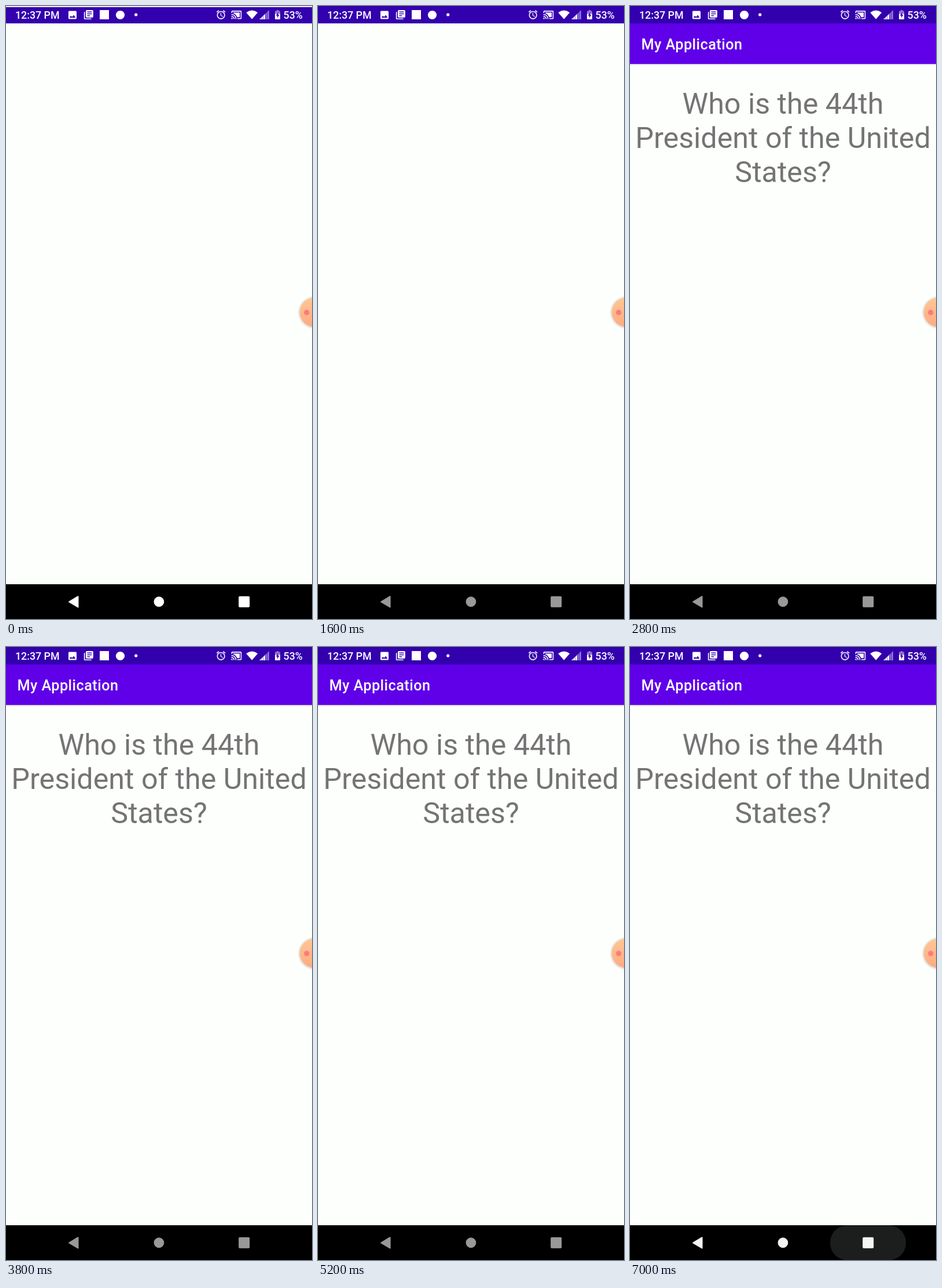
An HTML page for the animation above (7.1 s loop, 529x1058 px).

```html
<!DOCTYPE html>
<html lang="en">
<head>
<meta charset="utf-8">
<title>Quiz app launch</title>
<style>
  html, body { margin: 0; width: 100%; height: 100%; overflow: hidden; background: #fdfffc; }
  svg { display: block; width: 100vw; height: 100vh; }
  text { font-family: Roboto, "Noto Sans", sans-serif; }
  .status { font-size: 17.8px; font-weight: 500; }
  .title { font-size: 25.2px; font-weight: 500; letter-spacing: .5px; }
  .question { font-size: 50.25px; fill: #747474; text-anchor: middle; }
</style>
</head>
<body>
<svg viewBox="0 0 529 1058" xmlns="http://www.w3.org/2000/svg">
  <defs>
    <linearGradient id="peach" x1="0" y1="0" x2="0" y2="1">
      <stop offset="0" stop-color="#ffc795"/>
      <stop offset="1" stop-color="#ffaa80"/>
    </linearGradient>
    <radialGradient id="halo">
      <stop offset=".86" stop-color="#b9a898" stop-opacity=".45"/>
      <stop offset="1" stop-color="#b9a898" stop-opacity="0"/>
    </radialGradient>
    <linearGradient id="shade" x1="0" y1="0" x2="0" y2="1">
      <stop offset="0" stop-color="#6040a0" stop-opacity=".25"/>
      <stop offset="1" stop-color="#6040a0" stop-opacity="0"/>
    </linearGradient>
  </defs>

  <rect width="529" height="1058" fill="#fdfffc"/>

  <g id="content">
    <rect y="100" width="529" height="3" fill="url(#shade)"/>
    <rect y="29" width="529" height="71" fill="#5f00e9"/>
    <text class="title" x="19.5" y="74.6" fill="#fff">My Application</text>
    <g class="question">
      <text x="264.5" y="186">Who is the 44th</text>
      <text x="264.5" y="245">President of the United</text>
      <text x="264.5" y="304">States?</text>
    </g>
  </g>

  <rect width="529" height="30" fill="#3300ae"/>
  <rect id="topEdge" width="529" height="2" fill="#f1eff6"/>

  <g fill="#fff">
    <text class="status" x="16" y="22">12:37 PM</text>
    <path transform="translate(105.6 6.1) scale(.78)" d="M21 19V5c0-1.1-.9-2-2-2H5c-1.1 0-2 .9-2 2v14c0 1.1.9 2 2 2h14c1.1 0 2-.9 2-2zM8.5 13.5l2.5 3.01L14.5 12l4.5 6H5l3.5-4.5z"/>
    <path transform="translate(133.2 5.5) scale(.8)" d="M4 6H2v14c0 1.1.9 2 2 2h14v-2H4V6zm16-4H8c-1.1 0-2 .9-2 2v12c0 1.1.9 2 2 2h12c1.1 0 2-.9 2-2V4c0-1.1-.9-2-2-2zm-1 9H9V9h10v2zm-4 4H9v-2h6v2zm4-8H9V5h10v2z"/>
    <rect x="162" y="7" width="16" height="16"/>
    <circle cx="197.5" cy="15.5" r="7.6"/>
    <circle cx="224.7" cy="15" r="2.6"/>

    <g id="sideIcons">
      <path transform="translate(362.3 5.6) scale(.78)" d="M22 5.72l-4.6-3.86-1.29 1.53 4.6 3.86L22 5.72zM7.88 3.39L6.6 1.86 2 5.71l1.29 1.53 4.59-3.85zM12.5 8H11v6l4.75 2.85.75-1.23-4-2.37V8zM12 4c-4.97 0-9 4.03-9 9s4.02 9 9 9c4.97 0 9-4.03 9-9s-4.03-9-9-9zm0 16c-3.87 0-7-3.13-7-7s3.13-7 7-7 7 3.13 7 7-3.13 7-7 7z"/>
      <path transform="translate(388.8 5.7) scale(.8)" d="M1 18v3h3c0-1.66-1.34-3-3-3zm0-4v2c2.76 0 5 2.24 5 5h2c0-3.87-3.13-7-7-7zm18-7H5v1.63c3.96 1.28 7.09 4.41 8.37 8.37H19V7zM1 10v2c4.97 0 9 4.03 9 9h2c0-6.08-4.93-11-11-11zm20-7H3c-1.1 0-2 .9-2 2v3h2V5h18v14h-7v2h7c1.1 0 2-.9 2-2V5c0-1.1-.9-2-2-2z"/>
    </g>
    <path id="arrows" d="M407.2 12.2L409.7 8.2l2.5 4zM407.2 15.2h5l-2.5 4z"/>
    <path d="M425.2 22.8L415.2 11.2Q425.2 3.8 435.2 11.2Z"/>
    <g id="signal"></g>
    <path opacity=".45" d="M467.8 7h3.4v1.6h2q.8 0 .8.8v5H465v-5q0-.8.8-.8h2z"/>
    <path d="M465 13.4h9v8.8q0 .8-.8.8h-7.4q-.8 0-.8-.8z"/>
    <path fill="#3300ae" d="M470.3 10.8l-3.6 5.6h2.2v4.4l3.5-5.8h-2.1z"/>
    <text class="status" x="479.6" y="22">53%</text>
  </g>

  <circle cx="533" cy="529" r="29" fill="url(#halo)"/>
  <circle cx="533" cy="528.5" r="25" fill="url(#peach)"/>
  <circle cx="519.8" cy="529" r="4.7" fill="#fb7c7b"/>

  <rect y="998" width="529" height="60" fill="#000"/>
  <rect id="ripple" y="998.5" height="59.5" rx="29" fill="#1b1e1d"/>
  <g id="nav" fill="#fff" stroke="#fff" stroke-linejoin="round">
    <path stroke-width="2" d="M109.2 1028.3L124.5 1019.2V1037.4Z"/>
    <circle cx="264.4" cy="1028.2" r="8.4"/>
    <rect x="403" y="1019.5" width="17.4" height="17.4" rx="1" stroke-width="1.6"/>
  </g>
</svg>
<script>
  const LOOP = 7100, STEP = 100;
  const get = id => document.getElementById(id);
  const clamp = v => Math.min(1, Math.max(0, v));
  const progress = (t, start, length) => clamp((t - start) / length);
  const show = (id, on) => get(id).setAttribute("visibility", on ? "visible" : "hidden");

  // Five slanted signal bars, the last two unlit.
  get("signal").innerHTML = [0, 1, 2, 3, 4].map(i => {
    const x = 438 + i * 3.5, w = 2.9;
    const top = px => 23 - (px - 438) * 0.94;
    return `<path opacity="${i < 3 ? 1 : 0.45}" d="M${x} 23V${top(x)}L${x + w} ${top(x + w)}V23Z"/>`;
  }).join("");

  function draw(t) {
    const busy = t >= 5700 && t < 6800;
    show("topEdge", t < 100);
    show("content", t >= 1700);
    show("arrows", busy);
    get("sideIcons").setAttribute("transform", `translate(${busy ? -8 : 0} 0)`);

    // The buttons dim slowly and light up again on touch.
    const dim = progress(t, 50, 1500) - progress(t, 6780, 250);
    get("nav").setAttribute("opacity", 1 - 0.4 * dim);

    const grow = 1 - (1 - progress(t, 6750, 250)) ** 3;
    const width = 97 + 34 * grow;
    show("ripple", t >= 6800);
    get("ripple").setAttribute("x", 411.5 - width / 2);
    get("ripple").setAttribute("width", width);
  }

  const start = performance.now();
  function tick() {
    const t = (performance.now() - start) % LOOP;
    draw(Math.floor(t / STEP) * STEP);
    requestAnimationFrame(tick);
  }
  tick();
</script>
</body>
</html>
```
